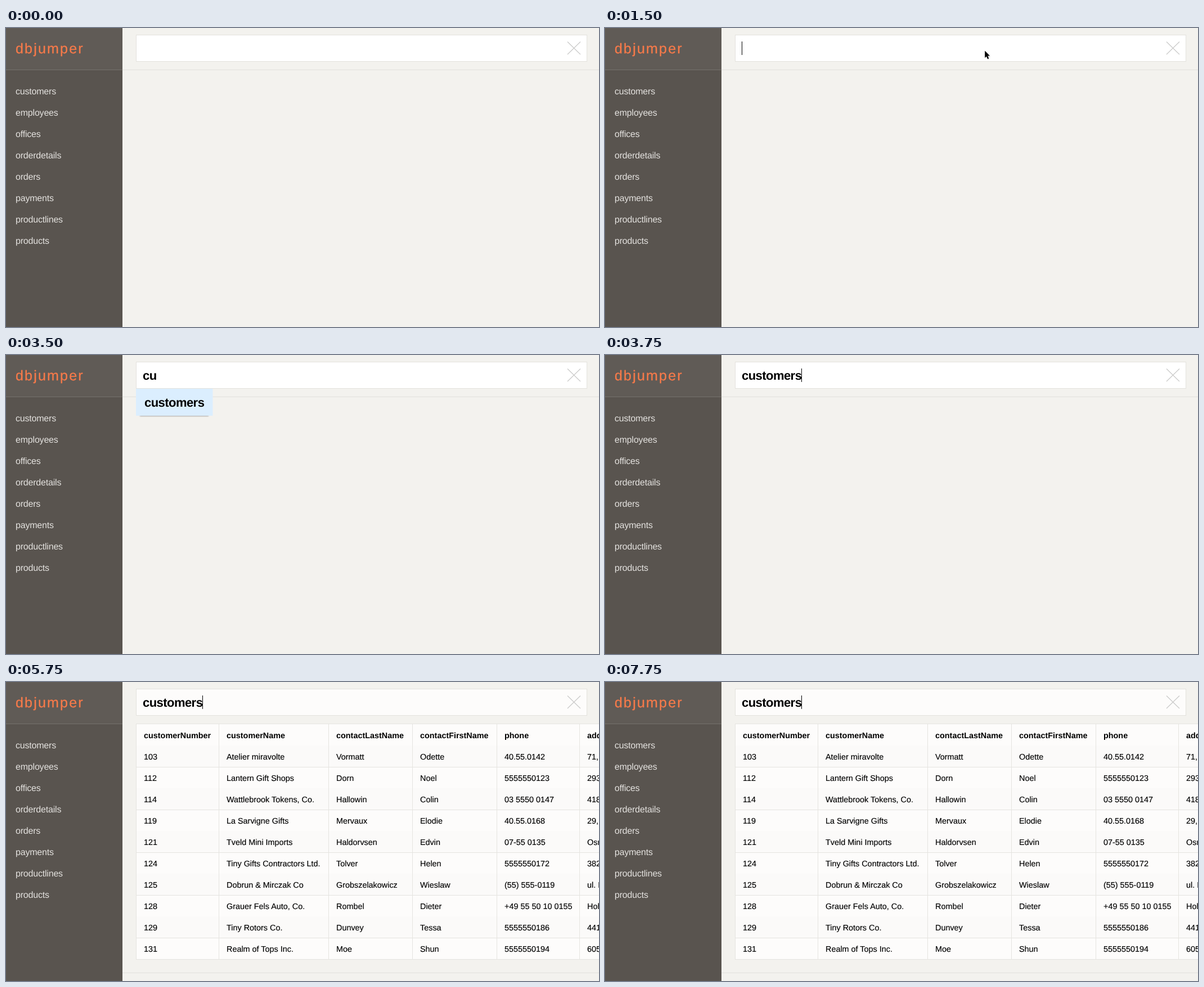
Animation, 1054 px wide and 532 px high, one loop 8 s. Source, as an HTML page:

```html
<!DOCTYPE html>
<html lang="en">
<head>
<meta charset="utf-8">
<title>dbjumper</title>
<style>
  html, body { margin: 0; width: 100%; height: 100%; overflow: hidden; background: #f3f2ee; }
  svg { display: block; font-family: "Liberation Sans", Arial, sans-serif; text-rendering: geometricPrecision; }
  .logo { font-size: 25px; letter-spacing: 2.2px; fill: #f67a4a; stroke: #f67a4a; stroke-width: 0.3px; }
  .nav { font-size: 16px; letter-spacing: -0.2px; fill: #e4e2df; }
  .query { font-size: 22px; font-weight: bold; letter-spacing: -0.55px; fill: #000; }
  .head { font-size: 14.4px; font-weight: bold; fill: #000; }
  .cell { font-size: 14.4px; fill: #000; stroke: #000; stroke-width: 0.15px; }
</style>
</head>
<body>
<svg id="stage" width="1054" height="532" viewBox="0 0 1054 532">
  <defs>
    <filter id="soft" x="-20%" y="-200%" width="140%" height="500%"><feGaussianBlur stdDeviation="0.8"/></filter>
  </defs>
  <rect width="1054" height="532" fill="#f3f2ee"/>
  <rect id="rule" x="207" y="74" width="847" height="1" fill="#e1e0dc"/>
  <g id="side">
    <rect width="207" height="532" fill="#59544f"/>
    <rect width="207" height="74" fill="#605b56"/>
    <rect y="74" width="207" height="1" fill="#75716c"/>
    <text class="logo" x="17" y="45">dbjumper</text>
  </g>
  <rect id="field" x="231.5" y="12.5" width="801" height="47" stroke="#e3e2dd"/>
  <path d="M998 24.5L1021 47M1021 24.5L998 47" stroke="#c9c9c8" stroke-width="1.2"/>
  <g id="table"></g>
  <g id="menu">
    <rect x="238" y="105" width="122" height="4" fill="#000" opacity="0.3" filter="url(#soft)"/>
    <rect x="231" y="60" width="136.500" height="48" fill="#dbeefe"/>
    <text class="query" x="246" y="92">customers</text>
  </g>
  <text id="query" class="query" x="243" y="44"></text>
  <rect id="caret" y="24" width="1" height="24" fill="#000"/>
  <g id="pointer">
    <path d="M2 2V13.500L4.800 11L6.800 16L8.900 15L6.800 10.500H10.800Z" fill="#000" opacity="0.25" filter="url(#soft)"/>
    <path d="M1.200 0.500V13L4 10.400L6.100 15.200L8.300 14.200L6.200 9.600H10Z" fill="#000" stroke="#fff" stroke-width="1" paint-order="stroke"/>
  </g>
</svg>
<script>
const LOOP = 8000;
const $ = id => document.getElementById(id);

function add(parent, tag, attrs, text = '') {
  const el = document.createElementNS('http://www.w3.org/2000/svg', tag);
  for (const key in attrs) el.setAttribute(key, attrs[key]);
  el.textContent = text;
  parent.append(el);
}

const tables = ['customers', 'employees', 'offices', 'orderdetails', 'orders', 'payments', 'productlines', 'products'];
tables.forEach((name, i) => add($('side'), 'text', { class: 'nav', x: 17, y: 118 + 38 * i }, name));

const columns = [231, 378, 573, 722, 872, 1019];
const rows = [
  ['customerNumber', 'customerName', 'contactLastName', 'contactFirstName', 'phone', 'addressLine1'],
  ['103', 'Atelier miravolte', 'Vormatt', 'Odette', '40.55.0142', '71, rue'],
  ['112', 'Lantern Gift Shops', 'Dorn', 'Noel', '5555550123', '2930'],
  ['114', 'Wattlebrook Tokens, Co.', 'Hallowin', 'Colin', '03 5550 0147', '418'],
  ['119', 'La Sarvigne Gifts', 'Mervaux', 'Elodie', '40.55.0168', '29, rue'],
  ['121', 'Tveld Mini Imports', 'Haldorvsen', 'Edvin', '07-55 0135', 'Osmu'],
  ['124', 'Tiny Gifts Contractors Ltd.', 'Tolver', 'Helen', '5555550172', '3826'],
  ['125', 'Dobrun & Mirczak Co', 'Grobszelakowicz', 'Wieslaw', '(55) 555-0119', 'ul. L'],
  ['128', 'Grauer Fels Auto, Co.', 'Rombel', 'Dieter', '+49 55 50 10 0155', 'Hohn'],
  ['129', 'Tiny Rotors Co.', 'Dunvey', 'Tessa', '5555550186', '4417'],
  ['131', 'Realm of Tops Inc.', 'Moe', 'Shun', '5555550194', '6052']
];

function buildTable() {
  const g = $('table'), line = '#e5e4e0';
  const box = (x, y, width, height, fill) => add(g, 'rect', { x, y, width, height, fill });
  box(231, 74, 823, 420, '#fdfcfb');
  rows.forEach((row, r) => {
    const bottom = 113 + 38 * r;
    if (r % 2) box(231, bottom - 38, 823, 38, '#fbfaf9');
    box(231, bottom, 823, 1, line);
    row.forEach((value, c) =>
      add(g, 'text', { class: r ? 'cell' : 'head', x: columns[c] + 14, y: bottom - 13 }, value));
  });
  box(231, 74, 823, 1, line);
  for (const x of columns) box(x, 74, 1, 420, line);
}
buildTable();

// Each track holds [start ms, value] steps.
const pointerSteps = [[0, null], [250, [658, 3]], [500, [653, 26]], [750, [654, 27]],
  [1000, [656, 36]], [1250, [663, 40]], [1500, [674, 40]], [1750, null]];
const querySteps = [[0, ['', 243]], [3000, ['cu', 268]], [3750, ['customers', 349]]];
const caretToggles = [1000, 1750, 2250, 2750, 3000, 3500, 3750, 4250, 4750, 5250, 5750, 6250, 6750, 7250, 7750];

const at = (steps, t) => steps.filter(s => s[0] <= t).pop()[1];
const show = (id, on) => $(id).setAttribute('visibility', on ? 'visible' : 'hidden');

function draw(t) {
  const spot = at(pointerSteps, t);
  show('pointer', spot);
  if (spot) $('pointer').setAttribute('transform', `translate(${spot})`);

  const [text, caretX] = at(querySteps, t);
  $('query').textContent = text;
  $('caret').setAttribute('x', caretX);
  show('caret', caretToggles.filter(ms => ms <= t).length % 2);
  show('menu', t >= 3000 && t < 3750);

  const loaded = t >= 5750;
  show('table', loaded);
  $('rule').setAttribute('y', loaded ? 517 : 74);
  $('field').setAttribute('fill', loaded ? '#fdfcfb' : '#fff');
}

const start = performance.now();
function tick() {
  draw((performance.now() - start) % LOOP);
  requestAnimationFrame(tick);
}
tick();
</script>
</body>
</html>
```
